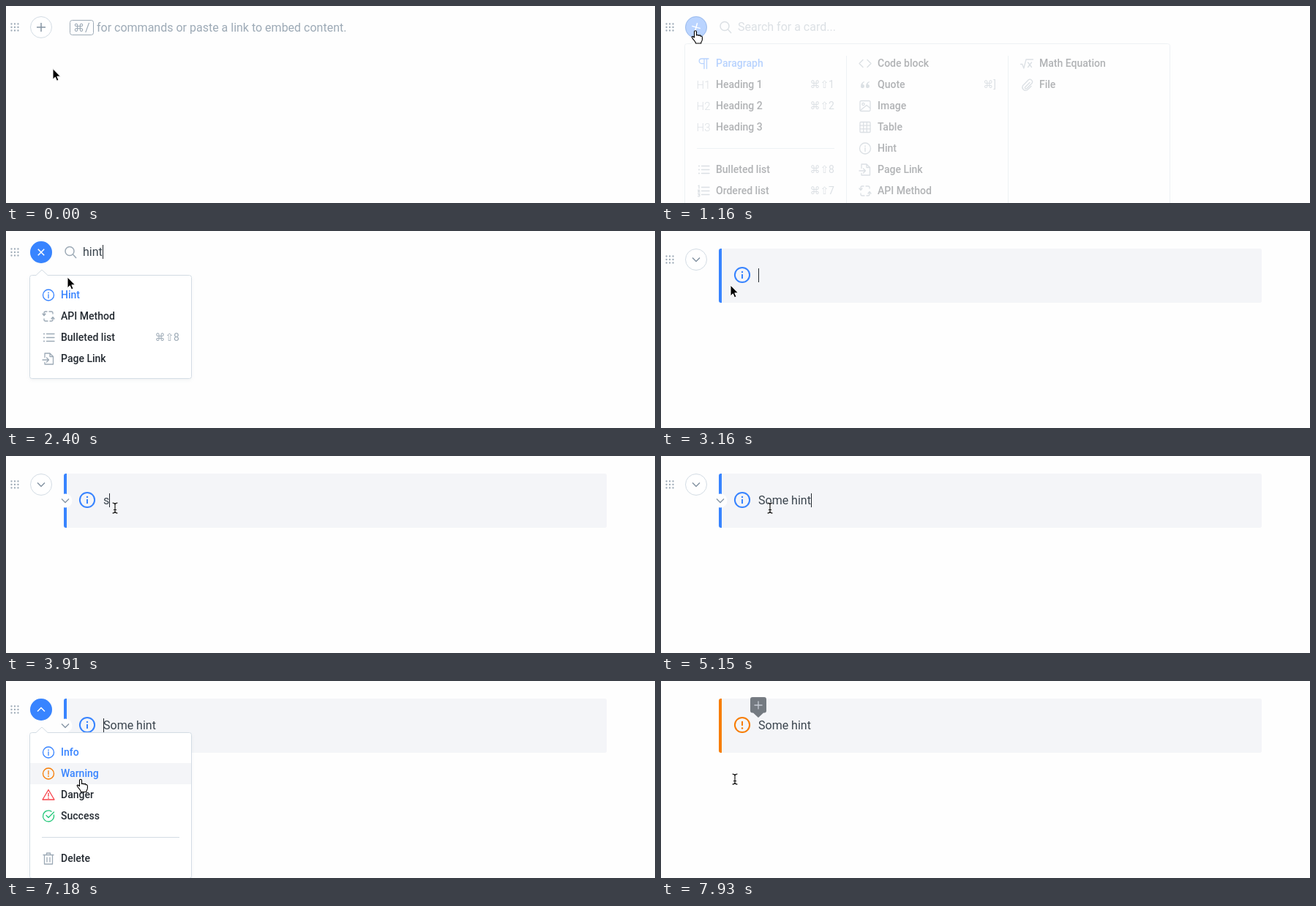
An HTML page that plays this animation: 887x269 px, repeating every 7990 ms.

```html
<!DOCTYPE html>
<html lang="en">
<head>
<meta charset="utf-8">
<title>Inserting a hint block</title>
<style>
html, body { margin: 0; width: 100%; height: 100%; overflow: hidden; background: #fefefe; }
svg { display: block; width: 887px; height: 269px; font: 16px Roboto, "DejaVu Sans", sans-serif; }
text { white-space: pre; }
</style>
</head>
<body>
<svg id="stage" viewBox="0 0 887 269"></svg>
<script>
const LOOP = 7990;
const GRAY = '#9daab6', BLUE = '#3884ff', INK = '#242a31', BODY = '#3b454e';
const LINE = '#d3dce4', SOFT = '#f4f5f8', ORANGE = '#f77d05', RED = '#f8414a', GREEN = '#26c97b';
const stage = document.getElementById('stage');
const pen = document.createElement('canvas').getContext('2d');

const path = (d, extra = '') => `<path d="${d}" ${extra}/>`;
const dot = (x, y, r, extra = '') => `<circle cx="${x}" cy="${y}" r="${r}" ${extra}/>`;
const box = (x, y, w, h, extra = '') => `<rect x="${x}" y="${y}" width="${w}" height="${h}" ${extra}/>`;
const text = (x, y, s, fill, extra = '') => `<text x="${x}" y="${y}" fill="${fill}" ${extra}>${s}</text>`;
const group = (x, y, body, extra = '') => `<g transform="translate(${x} ${y})" ${extra}>${body}</g>`;
const fade = (opacity, body) => opacity > 0 ? `<g opacity="${opacity}">${body}</g>` : '';
const textWidth = s => { pen.font = '16px Roboto, sans-serif'; return pen.measureText(s).width; };
const caret = (x, y) => box(Math.round(x), y, 1, 19, `fill="${INK}"`);
const between = (t, a, b) => t >= a && t < b;

// Stepped ease-out: 0 before the start, then four 60 ms steps up to 1.
function ramp(t, start) {
  if (t < start) return 0;
  return [.35, .72, .93, 1][Math.min(3, Math.floor((t - start) / 60))];
}

const solid = 'fill="currentColor" stroke="none"';
const heading = n => `<text y="5.5" font-size="15" font-weight="300" text-anchor="middle" ${solid}>H${n}</text>`;
const bang = dot(0, 3.4, .9, solid) + path('M0-3.8V1');
const rules = path('M-2.5-5H8M-2.5 0H8M-2.5 5H8');
const icons = {
  para: path('M7-6.5H-2.5a3.3 3.3 0 0 0 0 6.6H1M1-6.5V7M4.5-6.5V7'),
  h1: heading(1), h2: heading(2), h3: heading(3),
  code: path('M-3-5l-5 5 5 5M3-5l5 5-5 5'),
  quote: path('M-1.2-4.5Q-6-3-6 2a2.5 2.5 0 1 0 2.5-2.4Q-3.5-2.6-1-3.6zM5.8-4.5Q1-3 1 2a2.5 2.5 0 1 0 2.5-2.4Q3.5-2.6 6-3.6z', solid),
  image: box(-7, -7, 14, 14, 'rx="1.5"') + dot(-2.5, -2.5, 1.6) + path('M-6.5 6L2-1l5 4'),
  table: box(-7, -7, 14, 14, 'rx="1"') + path('M-7-2.3H7M-7 2.3H7M-2.3-7V7M2.3-7V7'),
  info: dot(0, 0, 7.5) + dot(0, -3.2, .9, solid) + path('M0-.8V4'),
  page: path('M-5-2v-5.5H2L6.5-3V7.5H-5V5M2-7.5V-3H6.5M-8 1.5h8M-2.5-1.5l3 3-3 3'),
  api: path('M-2-6.5h-2q-2 0-2 2v3M-8-3.5l2 2.5 2-2.5M2 6.5h2q2 0 2-2v-3M8 3.5L6 1 4 3.5M1-6.5h3q2 0 2 2v1M-1 6.5h-3q-2 0-2-2v-1'),
  list: dot(-6, -5, 1, solid) + dot(-6, 0, 1, solid) + dot(-6, 5, 1, solid) + rules,
  ordered: path('M-7-7l1-.5v4M-7.5-1h2.2l-2 2.5h2.3M-7.5 4h2.5l-1.2 1.5q1.5.3 1 1.5-1 1-2.3.3') + rules,
  math: path('M-8.5 1h2.3l2 5.5L-1-5.5H8.5M1.5-1.5l5 6.5M6.5-1.5l-5 6.5'),
  clip: path('M4-3L-2.5 3.5a1.5 1.5 0 0 0 2 2L6.5-1.5a3.3 3.3 0 0 0-4.7-4.7L-5.5 1.2a4.4 4.4 0 0 0 6 6L6 2'),
  warn: dot(0, 0, 7.5) + bang,
  danger: path('M0-7L8 6.5H-8z') + group(0, 1.3, dot(0, 3, .9, solid) + path('M0-3.5V.8')),
  check: path('M7.4-1.5A7.5 7.5 0 1 1 4-6.4M-3-1l3 3L7.5-5.5'),
  trash: path('M-7-5H7M-2.5-5v-2.5h5V-5M-5.5-5V7.5h11V-5M-2-1.5v6M2-1.5v6')
};
const icon = (name, x, y, color, width = 1.3) =>
  group(x, y, icons[name], `color="${color}" stroke="currentColor" stroke-width="${width}" fill="none" stroke-linecap="round" stroke-linejoin="round"`);

const item = (glyph, label, keys = '', color = GRAY) => ({ glyph, label, keys, color });
const I = {
  para: item('para', 'Paragraph'),
  h1: item('h1', 'Heading 1', '⌘⇧1'), h2: item('h2', 'Heading 2', '⌘⇧2'), h3: item('h3', 'Heading 3'),
  list: item('list', 'Bulleted list', '⌘⇧8'), ordered: item('ordered', 'Ordered list', '⌘⇧7'),
  hint: item('info', 'Hint'), page: item('page', 'Page Link'), api: item('api', 'API Method'),
  math: item('math', 'Math Equation')
};
const CARDS = [
  [I.para, I.h1, I.h2, I.h3, null, I.list, I.ordered],
  [item('code', 'Code block'), item('quote', 'Quote', '⌘]'), item('image', 'Image'),
    item('table', 'Table'), I.hint, I.page, I.api],
  [I.math, item('clip', 'File')]
];
const FIRST_MATCHES = [[I.hint, I.h1, I.h2, I.h3, I.para, I.api, I.math]];
const MATCHES = [[I.hint, I.api, I.list, I.page]];
const STYLES = [[
  item('info', 'Info', '', BLUE), item('warn', 'Warning', '', ORANGE),
  item('danger', 'Danger', '', RED), item('check', 'Success', '', GREEN),
  null, item('trash', 'Delete')
]];

function menu(columns, top, height, mouse) {
  const width = columns.length * 221;
  let out = path(`M32.5 ${top + 3.5}q0-3 3-3H41l8-7.5 8 7.5H${width + 29.5}q3 0 3 3v${height - 6}q0 3-3 3H35.5q-3 0-3-3z`,
    `fill="#fff" stroke="${LINE}" style="filter:drop-shadow(0 2px 2px #74819114)"`);
  columns.forEach((rows, c) => {
    const left = 32 + c * 221;
    if (c) out += path(`M${left + .5} ${top + 17}V300`, `stroke="${LINE}"`);
    rows.forEach((row, r) => {
      const y = top + 27 + r * 29;
      if (!row) {
        out += path(`M${left + 17} ${y + .5}h188`, `stroke="${LINE}"`);
        return;
      }
      const active = !c && !r;
      const hover = Math.abs(mouse.y - y) < 14.5 && mouse.x > left && mouse.x < left + 221;
      if (hover) out += box(left + 1, y - 14, 220, 29, `fill="${SOFT}"`);
      out += icon(row.glyph, left + 26, y + .5, active ? BLUE : row.color);
      out += text(left + 43, y + 5, row.label, active || hover ? BLUE : INK, 'font-size="14" font-weight="500"');
      if (row.keys) out += text(left + 205, y + 5, row.keys, GRAY, 'font-size="14" text-anchor="end"');
    });
  });
  return out;
}

const glyphs = {
  arrow: path('M0 0V14.8L3.3 11.7 5.5 16.8 8 15.7 5.8 10.7H10.5z', 'fill="#000" stroke="#fff" stroke-width="1"'),
  hand: path('M-1.5 9V1.3a1.5 1.5 0 0 1 3 0V6Q4-.2+5 4.4 6.4 7 5 7 7.2 9.4 6.6 9.4 9v3q-.3 2-1.6 3.4v1.6H.6q-.8-2.4-2.4-4.2-2.6-2.6-3.2-4.6.9-1.6 3.5.8z'
    .replace('Q4-.2+5 4.4 6.4', 'Q4 5 4.4 6.4'), 'fill="#fff" stroke="#000" stroke-width="1.1" stroke-linejoin="round"'),
  beam: ['stroke="#fff" stroke-width="2.6"', 'stroke="#000" stroke-width="1.1"'].map(s =>
    path('M-3.5-7Q-.5-7 0-5 .5-7 3.5-7M0-5V5M-3.5 7Q-.5 7 0 5 .5 7 3.5 7M-2 2.5H2', `fill="none" ${s}`)).join('')
};

// Time, x, y and pointer shape.
const route = [
  [0, 64, 85.5, 'arrow'], [50, 65, 86, 'arrow'], [50, 65, 86, 'arrow'], [290, 65, 85, 'arrow'],
  [470, 66, 82, 'arrow'], [640, 53, 42, 'hand'], [810, 47, 23, 'hand'], [920, 47, 34, 'hand'],
  [2280, 47, 34, 'hand'], [2340, 64, 48, 'arrow'], [2400, 84, 63, 'arrow'], [2450, 93, 73, 'arrow'],
  [2510, 97, 79, 'hand'], [2690, 94, 74, 'arrow'], [3160, 95, 74, 'arrow'], [3400, 133, 72, 'beam'],
  [3570, 149, 71, 'beam'], [5620, 149, 71, 'beam'], [5680, 130, 70, 'arrow'], [5790, 107, 67, 'arrow'],
  [6450, 107, 67, 'arrow'], [6680, 106, 85, 'hand'], [7180, 102, 134.5, 'hand'], [7820, 101, 134, 'beam'], [LOOP, 101, 134, 'beam']
];
function pointer(t) {
  const i = route.findLastIndex(k => k[0] <= t);
  const [t0, x, y, shape] = route[i], [t1, x1, y1] = route[i + 1];
  const pause = t1 - t0 > 560 || between(t0, 0, 400) || t0 === 2510 || t0 === 2690;
  const u = pause ? 0 : Math.floor((t - t0) / 57) * 57 / (t1 - t0);
  return { x: x + (x1 - x) * u, y: y + (y1 - y) * u, shape };
}

function handle(y, p, isBlock) {
  let out = '';
  for (let i = 0; i < 9; i++) out += dot(7.5 + i % 3 * 4.5, y - 4.5 + Math.floor(i / 3) * 4.5, 1.15, `fill="${GRAY}"`);
  out += dot(48, y, 14.5, `fill="#fff" stroke="${LINE}"`);
  out += dot(48, y, 15, `fill="${BLUE}" opacity="${p}"`);
  const angle = isBlock ? 180 * (1 - p) : 45 * p;
  const shape = isBlock ? 'M-5 2.5L0-2.5 5 2.5' : 'M-6 0H6M0-6V6';
  const scale = isBlock && p > 0 ? .6 + .4 * p : 1;
  return out + `<g transform="translate(48 ${y}) rotate(${angle}) scale(${scale})">` +
    path(shape, `fill="none" stroke="${p ? '#fff' : '#8594a3'}" stroke-width="1.5"`) + '</g>';
}

const placeholder = () =>
  box(87.5, 19.5, 32, 20, `rx="3" fill="none" stroke="${GRAY}"`) +
  text(92, 35, '⌘', GRAY, 'font-size="15"') + text(108, 35, '/', GRAY) +
  text(124, 35, 'for commands or paste a link to embed content.', GRAY);

function search(t) {
  const typed = 'hint'.slice(0, [1810, 1920, 2040, 2160].filter(k => t >= k).length);
  const blink = between(t, 1330, 1690) || typed;
  return dot(87, 27.5, 6, `fill="none" stroke="${GRAY}" stroke-width="1.5"`) +
    path('M91.5 32l4.5 5', `stroke="${GRAY}" stroke-width="1.5"`) +
    text(105, 34, typed || 'Search for a card...', typed ? BODY : GRAY) +
    (blink ? caret(105 + textWidth(typed), 19) : '');
}

function hintText(t) {
  if (between(t, 3740, 4200)) return 's';
  return t < 4380 ? '' : 'Some hint'.slice(0, 1 + Math.floor((t - 4380) / 96));
}

function hintBlock(t) {
  const warned = t >= 7300, color = warned ? ORANGE : BLUE, typed = hintText(t);
  let out = box(79, 24, 742, 74, `rx="3" fill="${SOFT}"`) +
    path('M83 24V98H82Q79 98 79 95V27Q79 24 82 24z', `fill="${color}"`);
  if (typed && t < 7580) {
    out += dot(81, 61, 9.5, 'fill="#fefefe"') +
      path('M76 58.5l5 5 5-5', 'fill="none" stroke="#8594a3" stroke-width="1.3"');
  }
  out += dot(111, 60, 10.1, `fill="none" stroke="${color}" stroke-width="2"`);
  out += warned
    ? path('M111 55v6', `stroke="${color}" stroke-width="2"`) + dot(111, 64.5, 1.2, `fill="${color}"`)
    : path('M111 59v6', `stroke="${color}" stroke-width="2"`) + dot(111, 56, 1.2, `fill="${color}"`);
  out += text(133, 66, typed, BODY);
  const hidden = between(t, 3200, 3740) || between(t, 6560, 7050) || warned;
  if (!hidden) out += caret(133 + (t < 5680 ? textWidth(typed) : 0), 51);
  return out;
}

const insertTip = () =>
  path('M125 22h16q3 0 3 3v15.5q0 3-3 3h-1l-7 6.5-7-6.5h-1q-3 0-3-3V25q0-3 3-3z', 'fill="#444b54"') +
  path('M127.5 33h11M133 27.5v11', 'stroke="#b4bcc6" stroke-width="1.3"');

function render(t) {
  const mouse = pointer(t);
  let out = '';
  if (t < 2690) {
    const p = ramp(t, 1160);
    out += p ? fade(p, search(t)) : placeholder();
    out += handle(29, p, false);
    const columns = t < 1810 ? CARDS : t < 1920 ? FIRST_MATCHES : MATCHES;
    const height = t < 1920 ? 260 : 141;
    out += fade(p, menu(columns, 60 - Math.round((1 - p) * 14), height, mouse));
  } else {
    const p = t < 7300 ? ramp(t, 6090) : 1 - ramp(t, 7300);
    const shown = 1 - ramp(t, 7530);
    out += hintBlock(t) + fade(shown, handle(39, p, true));
    if (t < 2800) out += fade(.35, menu(MATCHES, 60, 141, mouse));
    out += fade(p, menu(STYLES, 70 - Math.round((1 - p) * 14), 199, mouse));
    out += fade(ramp(t, 7820), insertTip());
  }
  stage.innerHTML = out + group(mouse.x, mouse.y, glyphs[mouse.shape]);
}

function tick() {
  render(performance.now() % LOOP);
  requestAnimationFrame(tick);
}
tick();
</script>
</body>
</html>
```
